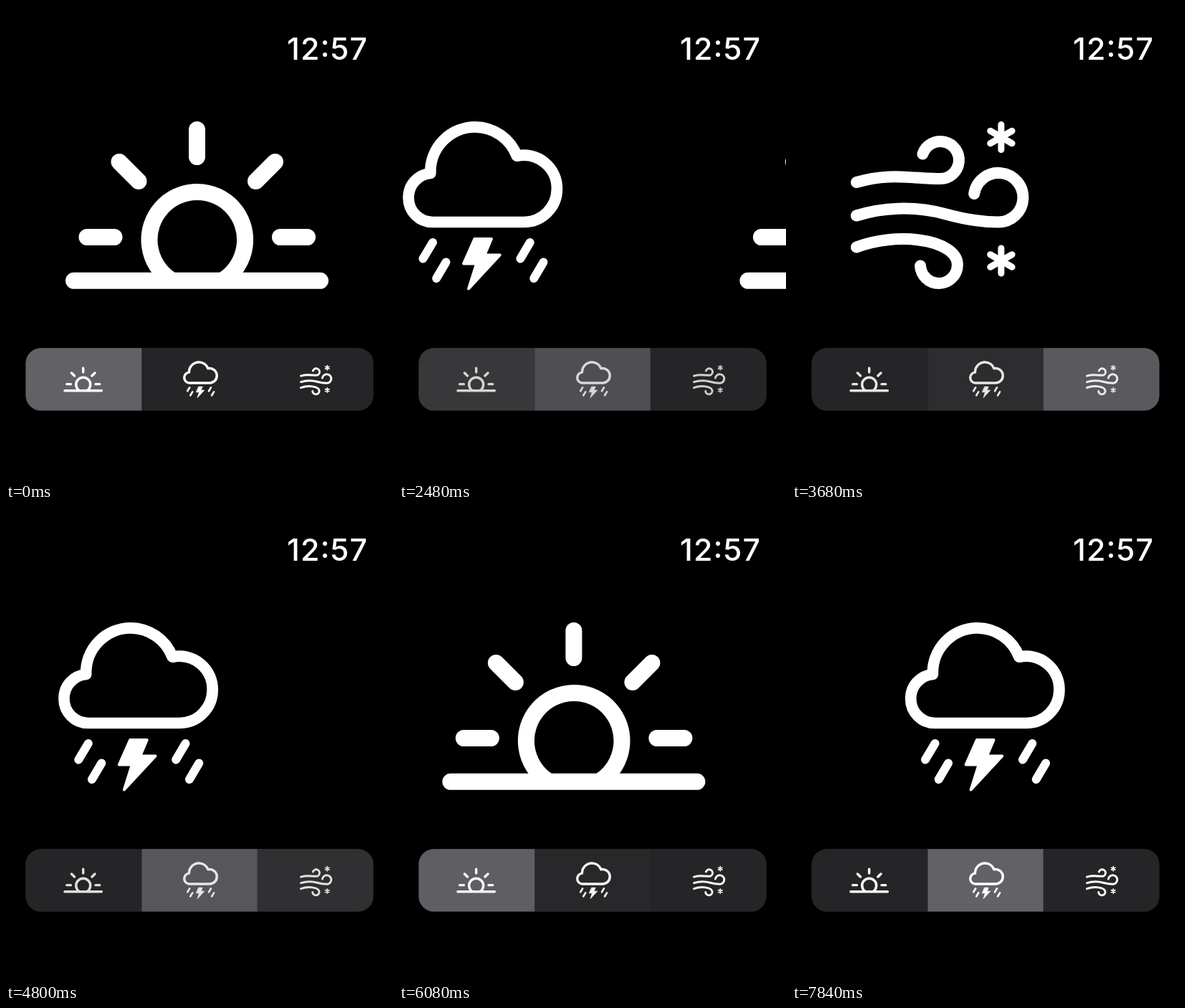
Animation, 540 px wide and 660 px high, one loop 8.08 s. Source, as an HTML page:

```html
<!DOCTYPE html>
<html lang="en">
<head>
<meta charset="utf-8">
<title>Weather picker</title>
<style>
  html, body { margin: 0; height: 100%; overflow: hidden; background: #000; }
  svg { display: block; width: 100%; height: 100%; }
  .icon { fill: none; stroke: #fff; stroke-linecap: round; stroke-linejoin: round; }
  text {
    font: 500 43px Inter, sans-serif; font-feature-settings: "calt" 1;
    letter-spacing: 1px; fill: #fff; text-anchor: end;
  }
</style>
</head>
<body>
<svg viewBox="0 0 540 660">
  <defs>
    <clipPath id="bar"><rect x="27.5" y="477.3" width="485" height="87.2" rx="21"/></clipPath>

    <g id="icon0" class="icon" stroke-width="23">
      <path d="M94.5 383.3H438.5M266.5 172.5V210.5M113 322.5H151M382.5 322.5H420.5M158 217.5L185 244.5M375.5 217.5L348.5 244.5"/>
      <path stroke-linecap="butt" d="M229.4 381.6A66.8 66.8 0 1 1 304.2 381.6"/>
    </g>

    <g id="icon1" class="icon" stroke-width="15.7">
      <path d="M199.5 301.5A33.7 33.7 0 0 1 165.8 267.8A33.7 33.7 0 0 1 196.5 233.5A62.5 62.5 0 0 1 259 168.8A62.5 62.5 0 0 1 317 209.2A46.3 46.3 0 0 1 373 255.2A46.3 46.3 0 0 1 326.7 301.5Z"/>
      <path stroke-width="12" d="M199.6 330L186.1 352.5M218.1 357.5L204.8 380M335.3 330L322 352.5M354.1 357.5L340.8 380"/>
      <path stroke-width="4" fill="#fff" d="M258 325H281.5L272 347.5H293.3L249.7 394.5L260.7 359.5H242.7Z"/>
    </g>

    <path id="flake" stroke-width="9" d="M0 -17.5V17.5M-15.2 -8.75L15.2 8.75M-15.2 8.75L15.2 -8.75"/>
    <g id="icon2" class="icon" stroke-width="16">
      <path d="M152 246C190 235 217 238.5 234 239.5S262 241 269 241A26 26 0 1 0 244.5 206.5"/>
      <path d="M152 292.5C187 281.5 232 278 277 290.5C302 297.4 324 301.5 350 301.5A34.3 34.3 0 1 0 316.3 262"/>
      <path d="M152 336.5C180 326 212 323 239 326.5C274 331 293 345 293 361A26 26 0 0 1 267 387A26 26 0 0 1 241.2 362.5"/>
      <use href="#flake" x="354" y="183"/>
      <use href="#flake" x="354" y="355.5"/>
    </g>
  </defs>

  <text x="505" y="75.3">12:57</text>

  <use class="big" href="#icon0"/>
  <use class="big" href="#icon1"/>
  <use class="big" href="#icon2"/>

  <g clip-path="url(#bar)">
    <rect x="27" y="477" width="486" height="88" fill="rgb(37,37,39)"/>
    <rect class="cell" x="27" y="477" width="162.5" height="88"/>
    <rect class="cell" x="189.5" y="477" width="161.3" height="88"/>
    <rect class="cell" x="350.8" y="477" width="162.2" height="88"/>
  </g>
  <g id="small">
    <use href="#icon0" transform="translate(107.7 521) scale(.1495) translate(-266.5 -278)"/>
    <use href="#icon1" transform="translate(271.5 521) scale(.2195) translate(-269.5 -278.5)"/>
    <use href="#icon2" transform="translate(432.7 522) scale(.182) translate(-268.5 -278)"/>
  </g>
</svg>
<script>
const LOOP = 8080, TICK = 80, TRAVEL = 545, FADE_DELAY = 15;
// [start time, selected icon]
const moves = [[-2000, 0], [2258, 1], [3354, 2], [4509, 1], [5645, 0], [6845, 1]];
const idle = [37, 37, 39], active = [98, 97, 102];

const big = document.querySelectorAll('.big');
const cells = document.querySelectorAll('.cell');
const small = document.getElementById('small');

// Critically damped spring with a 0.55 s response
function spring(ms) {
  const x = Math.max(0, ms) / 1000 * 2 * Math.PI / 0.55;
  return 1 - (1 + x) * Math.exp(-x);
}

const mix = k => `rgb(${idle.map((c, i) => Math.round(c + (active[i] - c) * k))})`;

function draw(t) {
  const step = moves.findLastIndex(([start]) => start <= t);
  const [start, current] = moves[step];
  const previous = step ? moves[step - 1][1] : -1;
  const slide = spring(t - start);
  const fade = spring(t - start - FADE_DELAY);

  for (let i = 0; i < 3; i++) {
    const offset = i === current ? slide - 1 : i === previous ? slide : 2;
    const level = i === current ? fade : i === previous ? 1 - fade : 0;
    big[i].setAttribute('x', offset * TRAVEL);
    cells[i].setAttribute('fill', mix(level));
  }
  // Icons dip while the old and new copies cross-fade
  small.setAttribute('opacity', 1 - fade * (1 - fade));
}

function loop() {
  const t = performance.now() % LOOP;
  draw(Math.floor(t / TICK) * TICK);
  requestAnimationFrame(loop);
}
loop();
</script>
</body>
</html>
```
